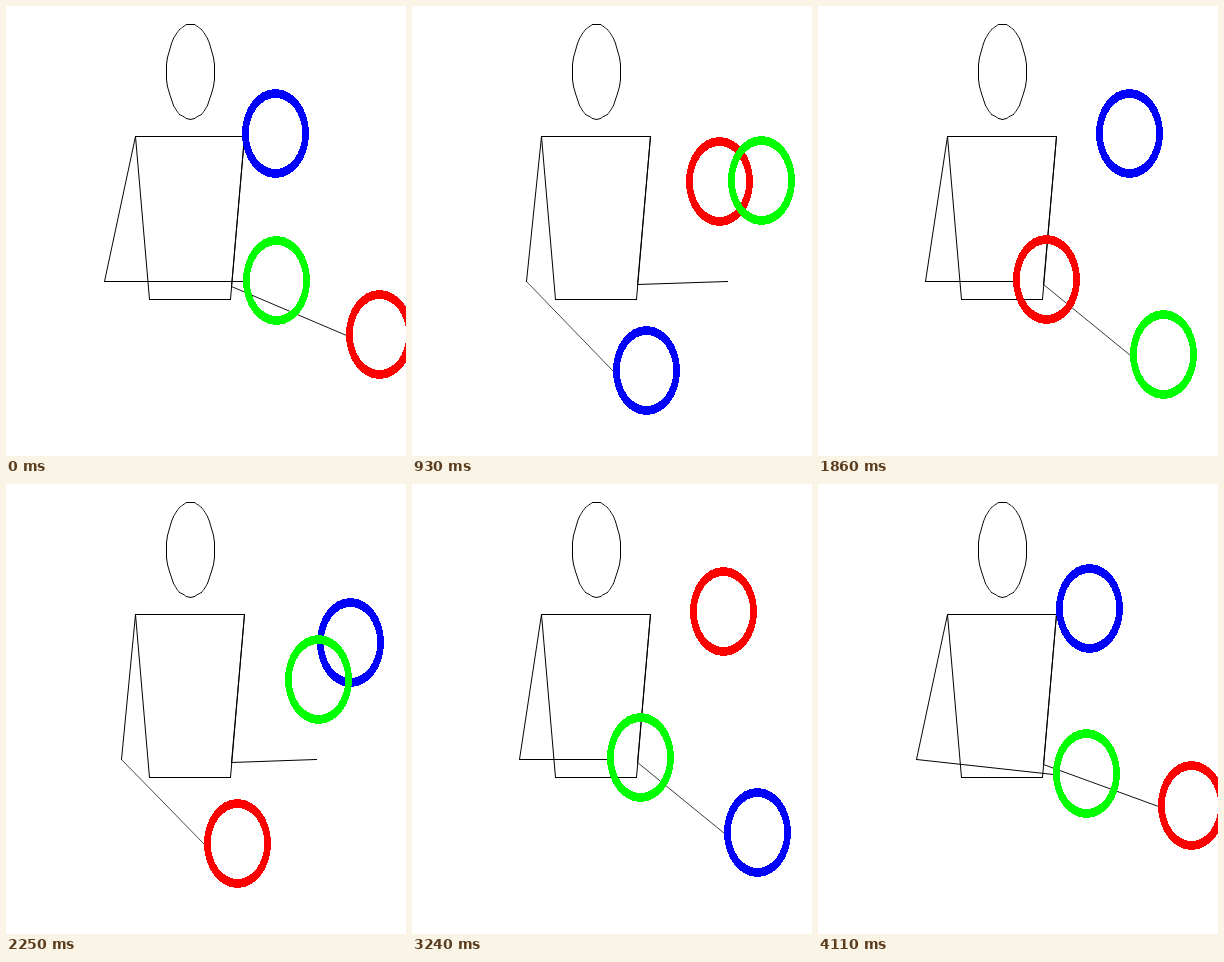
Write an HTML page that moves like this. It is 400 px wide and 450 px high and loops after 4140 ms.

```html
<!DOCTYPE html>
<html lang="en">
<head>
<meta charset="utf-8">
<title>Juggler</title>
<style>
  html, body { margin: 0; width: 100%; height: 100%; overflow: hidden; background: #fff; }
  svg { display: block; }
</style>
</head>
<body>
<svg width="400" height="450" viewBox="0 0 400 450" shape-rendering="crispEdges">
  <g id="lines" stroke="#000" stroke-linecap="square" transform="translate(.5 .5)"></g>
  <g id="rings" fill-rule="evenodd"></g>
</svg>
<script>
const TICK = 30;              // ms per step
const BEAT = 46;              // steps between two throws of one hand
const HALF = BEAT * 1.5;      // steps from one hand to the other
const LOOP = BEAT * 3;
const LAG = 0.02;
const HOLD = 30, FLIGHT = HALF - HOLD, CATCH = -7, THROW = CATCH + HOLD;

// Positions are the left edge and top of a ring; x is measured from the middle line.
const MIDDLE = 266.35, LEVEL = 230, GRAVITY = 0.399;
const CATCH_X = 70.8, THROW_X = 28.5;
const SPEED_X = (CATCH_X + THROW_X) / FLIGHT;
const SPEED_Y = GRAVITY * FLIGHT;
const SOFTEN = 0.55;          // share of the speed kept on catching
const RING = { w: 67, h: 89, hole: 0.8 };
const GRIP = 45;              // the hand holds a ring halfway down its left edge

const lerp = (a, b, s) => a + (b - a) * s;

function hermite(a, b, va, vb, s) {
  const r = 1 - s;
  return a * (1 + 2 * s) * r * r + b * s * s * (3 - 2 * s)
    + HOLD * (va * s * r * r - vb * s * s * r);
}

function carry(u) {
  const s = (u - CATCH) / HOLD;
  return {
    x: hermite(CATCH_X, THROW_X, SPEED_X * SOFTEN, -SPEED_X, s),
    y: hermite(LEVEL, LEVEL, SPEED_Y * SOFTEN, -SPEED_Y, s)
  };
}

function fly(n) {
  return {
    x: THROW_X - SPEED_X * n,
    y: LEVEL - GRAVITY * n * (FLIGHT - n)
  };
}

const place = ({ x, y }, side) => ({ x: Math.floor(MIDDLE + side * x), y: Math.floor(y) });

function ringAt(phase) {
  let side = phase < HALF ? 1 : -1;
  let u = phase % HALF;
  if (u >= HALF + CATCH) {
    u -= HALF;
    side = -side;
  }
  return place(u < THROW ? carry(u) : fly(u - THROW), side);
}

function handAt(phase, side) {
  const shift = side < 0 ? BEAT / 2 : 0;
  const u = (phase + shift - CATCH) % BEAT + CATCH;
  const back = Math.max(0, (u - THROW) / (BEAT - HOLD));
  const empty = u >= THROW;
  const point = empty ? { x: lerp(THROW_X, CATCH_X, back), y: LEVEL } : carry(u);
  const { x, y } = place(point, side);
  return { x, y: y + GRIP, empty, back };
}

function leftElbow(hand) {
  const x = hand.empty
    ? lerp(99, 107, hand.back)
    : Math.max(98, 111 - 0.257 * (hand.x - 192) + 0.097 * (hand.y - 307));
  return { x: Math.round(x), y: Math.min(275, hand.y) };
}

function rightElbow(hand) {
  return { x: 225, y: Math.round(278 + Math.max(0, hand.x - 312) * 0.08) };
}

const byId = id => document.getElementById(id);

function add(parent, tag) {
  return byId(parent).appendChild(document.createElementNS("http://www.w3.org/2000/svg", tag));
}

function set(node, attributes) {
  for (const name in attributes) node.setAttribute(name, attributes[name]);
}

// The width keeps slanted lines one pixel thick along their minor axis.
function setLine(line, a, b) {
  const dx = Math.abs(b.x - a.x), dy = Math.abs(b.y - a.y);
  const width = Math.max(dx, dy) / Math.hypot(dx, dy);
  set(line, { x1: a.x, y1: a.y, x2: b.x, y2: b.y, "stroke-width": width });
}

function addPolygon(points) {
  points.forEach((p, i) => setLine(add("lines", "line"), p, points[(i + 1) % points.length]));
}

const shoulders = [{ x: 129, y: 130 }, { x: 238, y: 130 }];
addPolygon([...shoulders, { x: 224, y: 293 }, { x: 143, y: 293 }]);
addPolygon(Array.from({ length: 40 }, (_, i) => {
  const angle = i * Math.PI / 20;
  return {
    x: Math.round(183.9 + 23.9 * Math.cos(angle)),
    y: Math.round(65.3 + 47.4 * Math.sin(angle))
  };
}));
const arms = shoulders.map(() => [add("lines", "line"), add("lines", "line")]);

function ellipse(k) {
  const cx = RING.w / 2, cy = RING.h / 2, rx = cx * k, ry = cy * k;
  return `M${cx - rx} ${cy}a${rx} ${ry} 0 1 0 ${2 * rx} 0a${rx} ${ry} 0 1 0 ${-2 * rx} 0z`;
}

const rings = ["#f00", "#00f", "#0f0"].map(fill => {
  const ring = add("rings", "path");
  set(ring, { d: ellipse(1) + ellipse(RING.hole), fill });
  return ring;
});

function drawArm([upper, fore], shoulder, elbow, hand) {
  setLine(upper, shoulder, elbow);
  setLine(fore, elbow, hand);
}

function draw(time) {
  const phase = Math.floor(time / TICK) % LOOP + LOOP - LAG;
  rings.forEach((ring, i) => {
    const { x, y } = ringAt((phase + i * BEAT) % LOOP);
    set(ring, { transform: `translate(${x} ${y})` });
  });
  const left = handAt(phase, -1), right = handAt(phase, 1);
  drawArm(arms[0], shoulders[0], leftElbow(left), left);
  drawArm(arms[1], shoulders[1], rightElbow(right), right);
}

const start = performance.now();
function tick() {
  draw(performance.now() - start);
  requestAnimationFrame(tick);
}
tick();
</script>
</body>
</html>
```
